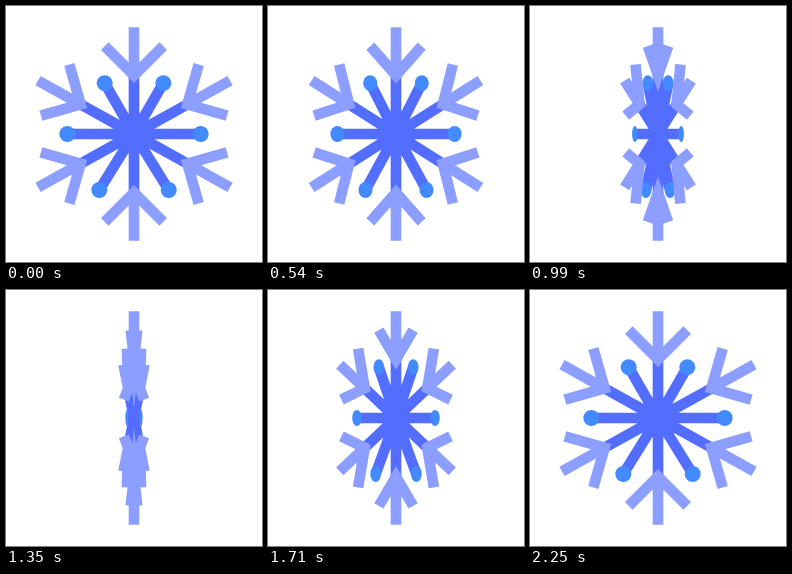
Recreate the animation shown at these times as an HTML page. Size 256 by 256 pixels, loop 2520 ms.

```html
<!DOCTYPE html>
<html lang="en">
<head>
<meta charset="utf-8">
<title>Snowflake</title>
<style>
  html, body { margin: 0; width: 100%; height: 100%; overflow: hidden; background: #fff; }
  svg { display: block; width: 100%; height: 100%; }
  path { fill: none; stroke-width: 2; stroke-miterlimit: 10; }
  #spokes { stroke: #536dfe; }
  #dots { fill: #448aff; }
  #arms { stroke: #8c9eff; }
</style>
</head>
<body>
<svg viewBox="-24 -24 48 48">
  <path id="spokes"/>
  <g id="dots"></g>
  <path id="arms"/>
</svg>
<script>
const LOOP = 2520, STEP = 90, HALF_TURN = 990;
const SIDE_ANGLE = 29.1, BRANCH = 7.75, DOT = 1.5;

const byId = id => document.getElementById(id);
const spokes = [], arms = [], dots = [];

// Point at an angle in degrees, counted upwards from the right, around a centre.
function polar(angle, radius, [x, y] = [0, 0]) {
  const a = angle * Math.PI / 180;
  return [x + radius * Math.cos(a), y - radius * Math.sin(a)];
}

function addArm(angle, inner, outer) {
  const fork = polar(angle, inner);
  const tips = [45, -45].map(turn => polar(angle + turn, BRANCH, fork));
  spokes.push([[0, 0], fork]);
  arms.push([polar(angle, outer), fork], [tips[0], fork, tips[1]]);
}

function addDot(angle, radius, minWidth) {
  const [x, y] = polar(angle, radius);
  const el = document.createElementNS("http://www.w3.org/2000/svg", "ellipse");
  el.setAttribute("cy", y);
  el.setAttribute("ry", DOT);
  byId("dots").append(el);
  spokes.push([[0, 0], [x, y]]);
  dots.push({ el, x, minWidth });
}

for (const up of [1, -1]) {
  addArm(90 * up, 11, 20);
  for (const angle of [SIDE_ANGLE * up, 180 - SIDE_ANGLE * up]) addArm(angle, 11.45, 20.6);
}
for (const flip of [a => a, a => 180 - a]) {
  addDot(flip(0), 12.5, 0.25);
  addDot(flip(60), 11, 1);
  addDot(flip(-58.2), 12.35, 1);
}

// Width of the turning flake: 0 edge-on at mid-loop, easing out to 1.
function widthAt(t) {
  const q = Math.min(1, Math.abs(t - LOOP / 2) / HALF_TURN);
  return q * (1.14 + q * (0.72 - 0.86 * q));
}

// Only positions are squeezed; strokes keep their weight.
const toPath = (lines, s) => lines
  .map(line => "M" + line.map(([x, y]) => `${(x * s).toFixed(4)} ${y.toFixed(4)}`).join("L"))
  .join("");

function draw(time) {
  const s = widthAt(Math.floor((time % LOOP) / STEP) * STEP);
  byId("spokes").setAttribute("d", toPath(spokes, s));
  byId("arms").setAttribute("d", toPath(arms, s));
  for (const { el, x, minWidth } of dots) {
    el.setAttribute("cx", x * s);
    el.setAttribute("rx", Math.max(minWidth, DOT * s));
  }
}

const start = performance.now();
function tick() {
  draw(performance.now() - start);
  requestAnimationFrame(tick);
}
tick();
</script>
</body>
</html>
```
